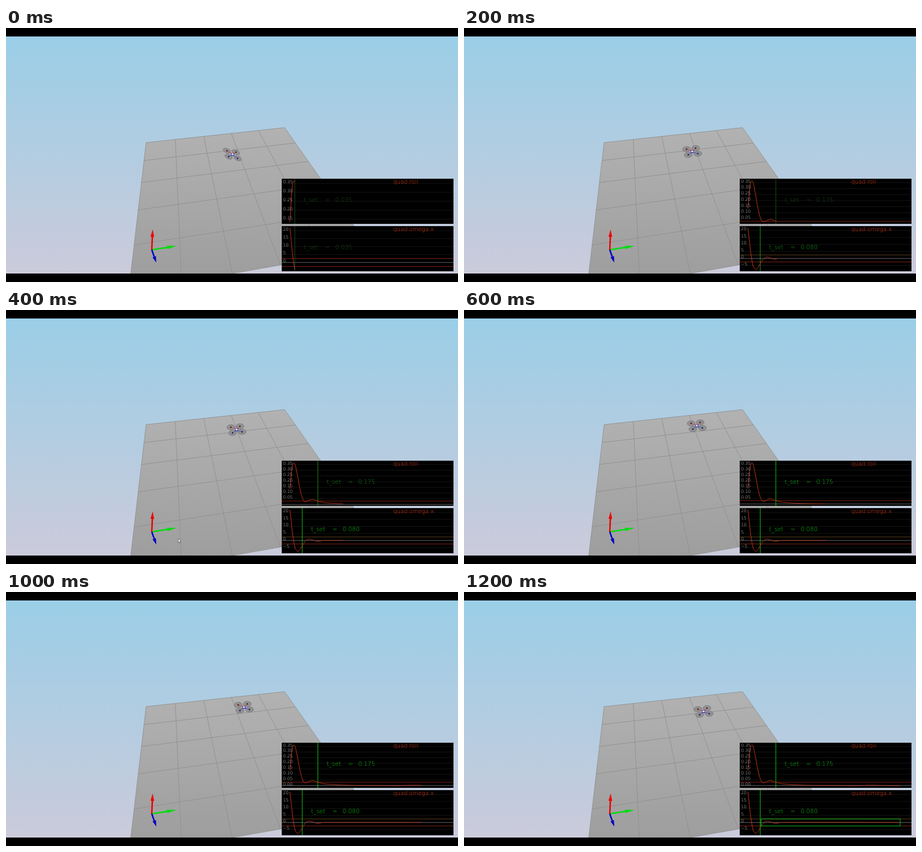
Animation of 800x450 px, one loop 1.3 s. Source, as an HTML page with a canvas:

```html
<!DOCTYPE html>
<html lang="en">
<head>
<meta charset="utf-8">
<title>Quadrotor roll response</title>
<style>
  html, body { margin: 0; width: 100%; height: 100%; overflow: hidden; background: #000; }
  canvas { display: block; }
</style>
</head>
<body>
<canvas id="stage" width="800" height="450"></canvas>
<script>
const g = document.getElementById('stage').getContext('2d');
const LOOP = 1300, STEP = 100;

// Smooth curve through [x, y] points
function curve(p, x) {
  const last = p.length - 1;
  if (x <= p[0][0]) return p[0][1];
  if (x >= p[last][0]) return p[last][1];
  let i = 0;
  while (x > p[i + 1][0]) i++;
  const slope = k => {
    const a = p[Math.max(k - 1, 0)], b = p[Math.min(k + 1, last)];
    return (b[1] - a[1]) / (b[0] - a[0]);
  };
  const w = p[i + 1][0] - p[i][0], s = (x - p[i][0]) / w, r = 1 - s;
  return p[i][1] * (1 + 2 * s) * r * r + p[i + 1][1] * s * s * (3 - 2 * s)
    + w * s * r * (slope(i) * r - slope(i + 1) * s);
}

function line(color, width, ...pts) {
  g.strokeStyle = color;
  g.lineWidth = width;
  g.beginPath();
  pts.forEach(p => g.lineTo(...p));
  g.stroke();
}

function shape(color, ...pts) {
  g.fillStyle = color;
  g.beginPath();
  pts.forEach(p => g.lineTo(...p));
  g.fill();
}

function text(str, x, y, size, color) {
  g.font = `200 ${size}px "DejaVu Sans", sans-serif`;
  g.fillStyle = color;
  g.fillText(str, x, y);
}

function vertical(from, to, c0, c1) {
  const grad = g.createLinearGradient(0, from, 0, to);
  grad.addColorStop(0, c0);
  grad.addColorStop(1, c1);
  return grad;
}

// Perspective position on the unit floor
function floorPoint(u, v) {
  const d = 1 + .0679 * u - .4517 * v;
  return [(248 + 278.5 * u - 129 * v) / d, (203 - 14.5 * u + 53.1 * v) / d];
}

function arrow(color, x, y, neck, halfWidth) {
  const ox = 258, oy = 393, len = Math.hypot(x - ox, y - oy);
  const dx = (x - ox) / len, dy = (y - oy) / len;
  const bx = x - dx * neck, by = y - dy * neck;
  line(color, 2.6, [ox, oy], [bx, by]);
  shape(color, [x, y], [bx - dy * halfWidth, by + dx * halfWidth],
    [bx + dy * halfWidth, by - dx * halfWidth]);
}

function scene() {
  g.fillStyle = vertical(15, 435, '#9aceе7'.replace('е', 'e'), '#cbcbdb');
  g.fillRect(0, 15, 800, 420);
  shape(vertical(176, 435, '#b2b2b2', '#9e9e9e'),
    floorPoint(0, 0), floorPoint(1, 0), floorPoint(1, 1), floorPoint(0, 1));
  for (let i = 0; i <= 5; i++) {
    line('#8f8f8f', .9, floorPoint(i / 5, 0), floorPoint(i / 5, 1));
    line('#8f8f8f', .9, floorPoint(0, i / 5), floorPoint(1, i / 5));
  }
  arrow('#00dc10', 302, 386, 17, 3);
  arrow('#0000c8', 266, 415.5, 11, 3.2);
  arrow('#ee0000', 259.6, 357, 13, 3.2);
}

const flightX = [[0, 401], [100, 402], [300, 406], [600, 412], [800, 416.5], [1000, 421], [1200, 424]];
const flightY = [[0, 224], [100, 222], [300, 215.6], [600, 205.2], [800, 202], [1000, 204.3], [1200, 211.8]];

function drone(ms) {
  const tilt = curve([[0, 1], [100, .08], [300, 0]], ms);
  const rotors = [
    [-10, -4.3 - 2.2 * tilt], [6, -6 + 2 * tilt],
    [-7, 5.8 - 1.8 * tilt], [10 - tilt, 3.8 + 3.2 * tilt]
  ];
  g.save();
  g.translate(curve(flightX, ms), curve(flightY, ms));
  for (const [x, y] of rotors) {
    g.beginPath();
    g.ellipse(x, y, 7, 4.6 - .8 * tilt, .45 * tilt - .03, 0, 7);
    g.fillStyle = '#919194';
    g.fill();
    g.strokeStyle = '#737377';
    g.lineWidth = .8;
    g.stroke();
  }
  rotors.forEach((p, i) => {
    line(i < 2 ? '#d85a3c' : '#6666a8', 1.3, [0, 0], p);
    g.fillStyle = i < 2 ? '#4a1820' : '#1c1c58';
    g.fillRect(p[0] - 1.2, p[1] - 1.2, 2.4, 2.4);
  });
  g.fillStyle = '#4848a8';
  g.fillRect(-3, -2.5, 6, 5.2);
  g.fillStyle = '#e8e4f4';
  g.fillRect(-1.8, -1.6, 3.6, 2.6);
  g.restore();
}

const roll = {
  title: 'quad.roll', top: 267, peakY: 271, height: 72.5, peak: .363,
  limits: [.03], tick: .05, digits: 2, settle: [.035, .09, .175], glow: [300, 500],
  points: [[502.5, .135], [505, .27], [507, .34], [509.5, .363], [512, .345], [516, .25],
    [521, .12], [526, .04], [530, .024], [536, .036], [543, .045], [552, .03], [562, .017],
    [575, .011], [600, .004], [640, .001], [670, 0], [690, -.003], [715, .003], [745, .001], [772, -.003]]
};
const omega = {
  title: 'quad.omega.x', top: 351, peakY: 354, height: 73.5, peak: 21.8,
  limits: [2.5, -2.5], tick: 5, digits: 0, settle: [.035, .08], glow: [0, 300],
  points: [[502.5, 21.8], [505, 13], [507, 5.5], [511, -4.3], [514, -7], [517, -7.7],
    [520, -6.6], [524, -4], [530, -.3], [536, 1], [543, .3], [551, -.6], [560, -.1], [575, 0], [772, 0]]
};
const penX = [[0, 511], [100, 533], [300, 575], [600, 641], [800, 686], [1000, 736], [1200, 772]];

function plot(p, ms) {
  const end = curve(penX, ms), values = [];
  for (let x = 502.5; x <= end; x += .5) values.push([x, curve(p.points, x)]);
  const low = Math.min(...values.map(v => v[1]));
  const scale = p.height / (p.peak - low);
  const yOf = v => p.peakY + (p.peak - v) * scale;
  const across = (v, color) => line(color, 1, [488, yOf(v)], [792, yOf(v)]);

  g.save();
  g.beginPath();
  g.rect(488, p.top, 304, 80);
  g.clip();
  g.fillStyle = '#000';
  g.fillRect(488, p.top, 304, 80);

  const ticks = [];
  for (let k = Math.ceil(low / p.tick); k * p.tick <= p.peak; k++) ticks.push(k * p.tick);
  ticks.forEach(v => across(v, '#151515'));
  across(0, '#606060');
  p.limits.forEach((v, i) => across(v, p === omega && i === 0 && ms > 0 ? '#5c401c' : '#7c2414'));

  const t = p.settle[Math.min(ms / STEP, p.settle.length - 1)], x = 501 + 291 * t;
  const k = Math.max(0, Math.min(1, (ms - p.glow[0]) / (p.glow[1] - p.glow[0])));
  const green = `rgb(${30 - 14 * k},${74 + 126 * k},${30 - 8 * k})`;
  line(green, 1, [x, p.top], [x, p.top + 80]);
  line('#c8361a', 1, ...values.map(v => [v[0], yOf(v[1])]));
  if (p === omega && ms === 1200) {
    g.strokeStyle = '#12a01c';
    g.lineWidth = 1.2;
    g.strokeRect(526, yOf(2.5), end - 526, 5 * scale);
  }

  ticks.forEach(v => text(v.toFixed(p.digits).replace('-', '−'), 490.5, yOf(v), 7.5, '#dedede'));
  text(p.title, 685.5, p.top + 8.5, 10, '#ee3c18');
  const base = p.top + 40.5;
  text('t_set', x + 15.5, base, 10.5, green);
  text('=', x + 53.5, base, 10.5, green);
  text(t.toFixed(3), x + 71.5, base, 10.5, green);
  g.restore();
}

function pointer() {
  const pts = [[305, 405], [305, 412], [306.6, 410.7], [307.8, 413], [308.8, 412.5], [307.8, 410.2], [309.6, 410]];
  shape('#fff', ...pts);
  line('#333', .6, ...pts, pts[0]);
}

function draw(now) {
  const ms = Math.floor(now % LOOP / STEP) * STEP;
  g.fillStyle = '#000';
  g.fillRect(0, 0, 800, 450);
  scene();
  drone(ms);
  if (ms === 300 || ms === 400) pointer();
  g.fillStyle = '#000';
  g.fillRect(0, 435, 800, 15);
  plot(roll, ms);
  plot(omega, ms);
  requestAnimationFrame(tick);
}

const start = performance.now();
function tick() {
  draw(performance.now() - start);
}
tick();
</script>
</body>
</html>
```
